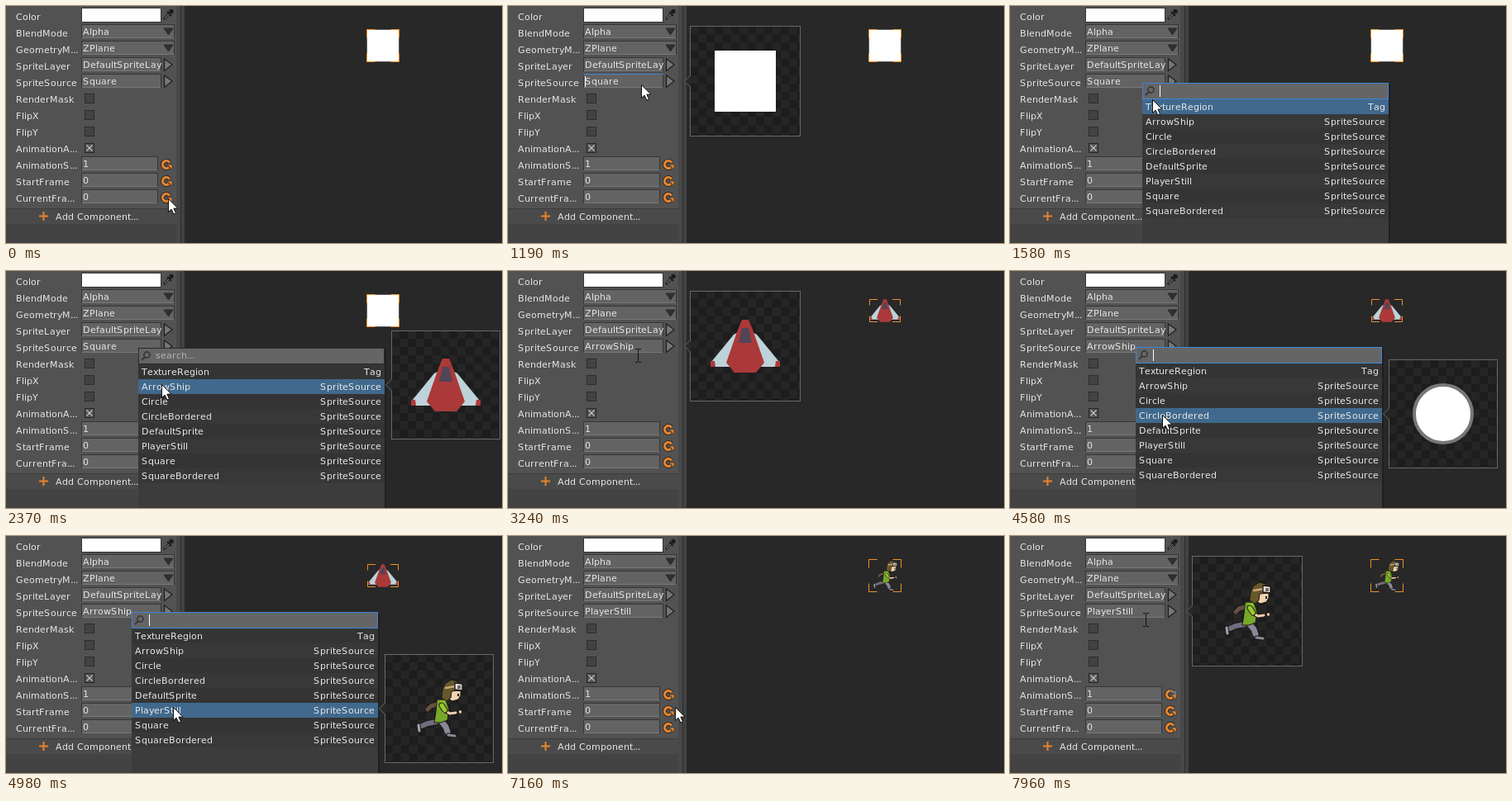
Write an HTML page with a canvas that moves like this. It is 600 px wide and 287 px high and loops after 8000 ms.

```html
<!DOCTYPE html>
<html lang="en">
<head>
<meta charset="utf-8">
<title>Sprite source picker</title>
<style>
  html, body { margin: 0; width: 100%; height: 100%; overflow: hidden; background: #282828; }
  canvas { display: block; }
</style>
</head>
<body>
<canvas id="stage" width="600" height="287"></canvas>
<script>
const ctx = document.getElementById('stage').getContext('2d');
const LOOP = 8000, STEP = 79.5;
const ORANGE = '#e8842c', TEXT = '#e6e6e6', EDGE = '#363636', FOCUS = '#3f86d8';
const FONT = '11px "DejaVu Sans", Verdana, sans-serif';

const labels = ['Color', 'BlendMode', 'GeometryM...', 'SpriteLayer', 'SpriteSource', 'RenderMask',
  'FlipX', 'FlipY', 'AnimationA...', 'AnimationS...', 'StartFrame', 'CurrentFra...'];
const items = ['TextureRegion', 'ArrowShip', 'Circle', 'CircleBordered', 'DefaultSprite',
  'PlayerStill', 'Square', 'SquareBordered'];

// Pointer moves: start time, number of steps, end position
const home = [197, 233];
const moves = [
  [80, 11, 163, 96], [960, 1, 163, 95], [1190, 1, 162, 95],
  [1500, 6, 189, 137],
  [2840, 6, 157, 102], [3320, 4, 154, 94],
  [3940, 5, 169, 129], [4340, 6, 190, 189], [4820, 3, 203, 207],
  [7400, 8, 164, 101]
];
const popups = [
  { from: 1270, to: 2610, x: 160, y: 93, blur: 2370 },
  { from: 3710, to: 7160, x: 152, y: 92, blur: Infinity }
];

function rect(x, y, w, h, color) {
  ctx.fillStyle = color;
  ctx.fillRect(x, y, w, h);
}

function frame(x, y, w, h, color) {
  ctx.strokeStyle = color;
  ctx.lineWidth = 1;
  ctx.strokeRect(x + .5, y + .5, w - 1, h - 1);
}

function trace(pts, close) {
  ctx.beginPath();
  for (let i = 0; i < pts.length; i += 2) ctx.lineTo(pts[i], pts[i + 1]);
  if (close) ctx.closePath();
}

function poly(pts, fill, stroke, width = 1) {
  trace(pts, true);
  if (fill) { ctx.fillStyle = fill; ctx.fill(); }
  if (stroke) { ctx.strokeStyle = stroke; ctx.lineWidth = width; ctx.stroke(); }
}

function line(pts, color, width) {
  trace(pts, false);
  ctx.strokeStyle = color;
  ctx.lineWidth = width;
  ctx.stroke();
}

function disc(x, y, r, fill, stroke, width = 1) {
  ctx.beginPath();
  ctx.arc(x, y, r, 0, Math.PI * 2);
  if (fill) { ctx.fillStyle = fill; ctx.fill(); }
  if (stroke) { ctx.strokeStyle = stroke; ctx.lineWidth = width; ctx.stroke(); }
}

// Whole-pixel advances as in a hinted UI: capitals and spaces round up sooner
const advance = ch => Math.round(ctx.measureText(ch).width + (/[A-Z ]/.test(ch) ? .53 : -.02));

function text(str, x, y, color = TEXT, right = false) {
  ctx.font = FONT;
  ctx.fillStyle = color;
  if (right) for (const ch of str) x -= advance(ch);
  for (const ch of str) {
    ctx.fillText(ch, x, y);
    x += advance(ch);
  }
}

function field(y, w, value, focus) {
  rect(91, y, w, 17, EDGE);
  rect(92, y + 1, w - 2, 15, '#636363');
  rect(92, y + 16, w - 2, 1, '#7a7a7a');
  if (focus) {
    rect(91, y, w, 1, FOCUS);
    rect(93, y + 3, 1, 13, '#fff');
  }
  text(value, 93, y + 13);
}

function refresh(y, dull) {
  const x = 194;
  for (const [color, w] of [['#2f2a26', 5], [ORANGE, 3]]) {
    ctx.strokeStyle = color;
    ctx.lineWidth = w;
    ctx.beginPath();
    ctx.arc(x, y, 4.5, .9, 5.7);
    ctx.stroke();
  }
  poly([x + 1, y, x + 7, y, x + 7, y + 6], ORANGE, '#3a2a1c', .6);
  if (dull) {
    ctx.strokeStyle = '#807b73';
    ctx.lineWidth = 3;
    ctx.beginPath();
    ctx.arc(x, y, 4.5, 4.6, 5.8);
    ctx.stroke();
    line([x + 6, y - 4, x + 6, y + 1], '#807b73', 2);
  }
}

function drawPanel(t, source, focus) {
  rect(0, 0, 206, 245, '#525252');
  rect(0, 245, 206, 1, '#3c3c3c');
  rect(0, 246, 206, 18, '#4a4a4a');
  rect(0, 264, 206, 23, '#434343');
  rect(206, 0, 5, 287, '#484848');
  rect(211, 0, 1, 287, '#2c2c2c');
  rect(212, 0, 4, 287, '#424242');

  labels.forEach((name, i) => text(name, 12, 17 + 20 * i));

  rect(91, 2, 97, 18, EDGE);
  rect(92, 3, 95, 16, '#fff');
  line([191, 16, 198, 9], '#1c1c1c', 2.6);
  line([192, 15, 197, 10], '#9a9a9a', 1);
  line([195, 7, 200, 12], '#1c1c1c', 2);
  disc(200, 6.5, 2.7, '#1c1c1c');

  field(22, 113, 'Alpha');
  field(42, 113, 'ZPlane');
  field(62, 97, 'DefaultSpriteLay');
  field(82, 97, source, focus);
  for (const y of [27, 47]) poly([191, y, 202, y, 196.5, y + 8], '#2f2f2f', '#2b2b2b');
  for (const y of [64, 84]) poly([191.5, y, 191.5, y + 14.5, 201, y + 7], '#777', '#202020', 1.3);

  for (let i = 0; i < 4; i++) {
    const y = 106 + 20 * i, on = i === 3;
    rect(95, y, 12, 12, on ? '#525252' : '#424242');
    frame(95, y, 12, 12, on ? '#262626' : '#2c2c2c');
    if (on) {
      line([97.5, y + 2.5, 104.5, y + 9.5], '#c8c8c8', 1.1);
      line([104.5, y + 2.5, 97.5, y + 9.5], '#c8c8c8', 1.1);
    }
  }

  ['1', '0', '0'].forEach((v, i) => {
    field(182 + 20 * i, 93, v);
    refresh(192 + 20 * i, i === 0 && t >= 7640);
  });

  rect(40, 253.5, 11, 2, ORANGE);
  rect(44.5, 249, 2, 11, ORANGE);
  text('Add Component...', 60, 259);
}

function drawShip() {
  for (const side of [-1, 1]) {
    ctx.save();
    ctx.scale(side, 1);
    poly([6, -18, 14, -14, 41, 19, 41, 25, 16, 25], '#bdd3d9');
    poly([37, 18, 42, 18, 42, 25, 36, 25], '#ad3a3a');
    ctx.restore();
  }
  poly([-4, -32, 4, -32, 9, -20, 23, 20, 13, 32, -13, 32, -23, 20, -9, -20], '#ab3939');
  poly([-4, -22, 4, -22, 8, -4, -8, -4], '#514558');
}

function limb(pts, color, width) {
  line(pts, '#1a1817', width + 2);
  line(pts, color, width);
}

function drawRunner() {
  const ink = '#1a1817';
  ctx.save();
  ctx.lineCap = ctx.lineJoin = 'round';
  limb([-3, 16, -14, 18, -21, 21], '#706d7d', 6);
  limb([-25, 20, -24, 27], '#a3a1ab', 3);
  limb([3, 16, 8, 22, 10, 28], '#8a8798', 7);
  limb([11, 32, 19, 33], '#8b8996', 3);
  limb([-3, -5, -10, -3, -14, 1], '#65513f', 5);
  poly([-3, -11, 8, -11, 12, 1, 10, 14, 2, 17, -6, 17, -4, 4], '#78a82b', ink);
  poly([1, -9, 6, -9, 9, 2, 4, 6], '#a2d02f');
  limb([8, 3, 13, 6, 20, 5], '#efcfac', 3);
  limb([3, -4, 7, 2], '#98c92d', 5);
  disc(25.5, 4, 2.2, '#f2d8b9', ink);
  poly([12, -22, 26, -22, 26, -16, 23, -11, 16, -9, 11, -12], '#f1d3b0', ink);
  poly([4, -24, 8, -31, 15, -35, 22, -33, 26, -27, 25, -22, 15, -21, 14, -13, 9, -9, 3, -13], '#67582a', ink);
  line([8, -25, 20, -27], '#c9a878', 2.5);
  poly([19, -31, 28, -30, 28, -22, 19, -23], '#e9e6df', ink, 1.3);
  rect(22, -28, 4, 4, '#746b61');
  rect(22, -18, 2, 3, ink);
  ctx.restore();
}

const sprites = {
  Square: { scale: .52, w: 20, h: 20, draw: () => rect(-37, -37, 74, 74, '#fff') },
  ArrowShip: { scale: .43, w: 19, h: 14, draw: drawShip },
  PlayerStill: { scale: .52, w: 20, h: 20, draw: drawRunner },
  Circle: { draw: () => disc(0, 0, 37, '#fff') },
  CircleBordered: { draw: () => disc(0, 0, 35, '#fff', '#777', 4) },
  DefaultSprite: { draw: () => rect(-37, -37, 74, 74, '#fff') }
};

function drawSprite(name, x, y, scale) {
  ctx.save();
  ctx.translate(x, y);
  ctx.scale(scale, scale);
  sprites[name].draw();
  ctx.restore();
}

function drawScene(name) {
  const { scale, w, h } = sprites[name], x = 456, y = 48;
  drawSprite(name, x, y, scale);
  for (const sx of [-1, 1]) for (const sy of [-1, 1]) {
    const cx = x + sx * (w - .5), cy = y + sy * (h - .5);
    line([cx - sx * w / 2, cy, cx, cy, cx, cy - sy * h / 2], '#f0902a', 1);
  }
}

function drawPreview(name, x, y, size) {
  const cell = 10, mid = y + size / 2;
  rect(x, y, size, size, '#1d1d1d');
  ctx.save();
  ctx.beginPath();
  ctx.rect(x, y, size, size);
  ctx.clip();
  for (let r = 0; r * cell < size; r++)
    for (let c = r % 2; c * cell < size; c += 2)
      rect(x + c * cell, y + r * cell, cell, cell, '#252525');
  ctx.restore();
  frame(x, y, size, size, '#686868');
  poly([x + 1, mid - 7, x - 7, mid, x + 1, mid + 7], '#282828');
  line([x + .5, mid - 7, x - 6.5, mid, x + .5, mid + 7], '#686868', 1);
  drawSprite(name, x + size / 2, mid, 1);
}

function drawPopup(p, t, mouse) {
  const { x, y } = p, right = x + 298;
  rect(right, y + 2, 2, 287, '#202020');
  rect(x, y, 298, 287, '#3c3c3c');
  rect(x, y, 298, 20, '#656565');

  disc(x + 10.5, y + 8.5, 3.6, null, '#373737', 1.6);
  line([x + 8, y + 11, x + 4, y + 15], '#373737', 2);
  if (t >= p.blur) {
    frame(x, y, 298, 20, '#2a2a2a');
    text('search...', x + 21, y + 13, '#b4b4b4');
  } else {
    frame(x, y, 298, 20, FOCUS);
    rect(x + 21, y + 3, 1, 14, '#fff');
  }

  const hover = Math.floor((mouse.y - y - 20) / 18);
  items.forEach((name, i) => {
    const top = y + 20 + 18 * i;
    rect(x, top, 298, 18, i === hover ? '#40698d' : i % 2 ? '#383838' : '#343434');
    text(name, x + 4, top + 13);
    text(i ? 'SpriteSource' : 'Tag', right - 4, top + 13, TEXT, true);
  });
  if (sprites[items[hover]]) drawPreview(items[hover], right + 8, y + 20 + 18 * hover - 59, 132);
}

function pointer(t) {
  let [x, y] = home;
  for (const [start, steps, tx, ty] of moves) {
    if (t < start) break;
    const k = Math.min(steps, Math.floor((t - start) / STEP) + 1) / steps;
    const e = steps > 6 ? k * k * (3 - 2 * k) : k * (1.4 - .4 * k);
    x += (tx - x) * e;
    y += (ty - y) * e;
  }
  return { x: Math.round(x), y: Math.round(y) };
}

function drawArrow(x, y) {
  const pts = [0, 0, 0, 16, 3.6, 12.6, 6.4, 18.6, 9, 17.4, 6.4, 11.6, 11.4, 11.6];
  poly(pts.map((v, i) => v + (i % 2 ? y + .5 : x - .5)), '#fff', '#111', 1);
}

function drawBeam(x, y) {
  rect(x, y - 7, 1, 15, '#111');
  for (const by of [y - 8, y + 8]) {
    rect(x - 3, by, 3, 1, '#111');
    rect(x + 1, by, 3, 1, '#111');
  }
}

function render(t) {
  const source = t < 2610 ? 'Square' : t < 7160 ? 'ArrowShip' : 'PlayerStill';
  const popup = popups.find(p => t >= p.from && t < p.to);
  const focus = (t >= 1190 && t < 1270) || (t >= 3630 && t < 3710);
  const mouse = pointer(t);
  const overField = !popup && mouse.x < 188 && mouse.y < 104;

  rect(0, 0, 600, 287, '#282828');
  drawPanel(t, source, focus);
  drawScene(source);
  if (popup) drawPopup(popup, t, mouse);
  else if (overField) drawPreview(source, 220, 24, 134);

  if (overField && !focus) drawBeam(mouse.x, mouse.y);
  else drawArrow(mouse.x, mouse.y);
}

const begin = performance.now();
function tick() {
  render((performance.now() - begin) % LOOP);
  requestAnimationFrame(tick);
}
tick();
</script>
</body>
</html>
```
